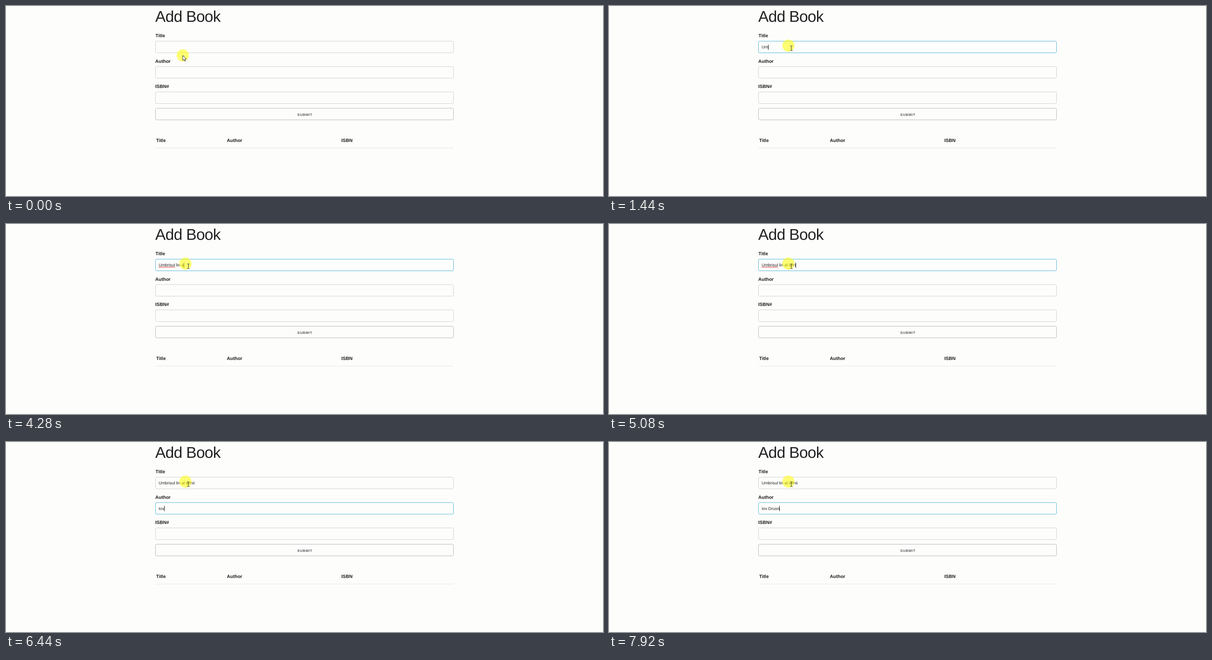
These frames come from a looping animation (1280 by 408 pixels, 8 s). An HTML page:

```html
<!DOCTYPE html>
<html lang="en">
<head>
<meta charset="utf-8">
<title>Add Book</title>
<style>
  html, body { margin: 0; width: 100%; height: 100%; overflow: hidden; background: #fdfdfc; }
  svg { display: block; width: 1280px; height: 408px; }
  text { font-family: "Liberation Sans", Arial, sans-serif; fill: #222; white-space: pre; text-rendering: geometricPrecision; }
  .heading { font-size: 33.5px; letter-spacing: -0.67px; }
  .label { font-size: 10.05px; font-weight: 700; fill: #1c1c1c; }
  .submit { font-size: 7.37px; font-weight: 700; letter-spacing: 0.67px; fill: #555; }
  .value { font-size: 8.93px; }
  .box { fill: none; stroke: #d1d1d1; }
  .button { stroke: #bbb; }
  .box.focused { stroke: #58b9d6; }
</style>
</head>
<body>
<svg id="stage" viewBox="0 0 1280 408"></svg>
<script>
const LOOP = 8000;
const stage = document.getElementById("stage");

function add(tag, attrs, content = "") {
  const node = document.createElementNS("http://www.w3.org/2000/svg", tag);
  set(node, attrs);
  node.textContent = content;
  return stage.appendChild(node);
}
function set(node, attrs) {
  for (const key in attrs) node.setAttribute(key, attrs[key]);
}
function show(node, visible) {
  node.setAttribute("visibility", visible ? "visible" : "hidden");
}
const label = (x, y, content, kind = "label") => add("text", { x, y, class: kind }, content);
const box = (y, kind = "box") => add("rect", { x: 320.5, y, width: 639, height: 25, rx: 2.7, class: kind });

label(320, 34, "Add Book", "heading");
label(320.5, 67.2, "Title");
label(320, 121.8, "Author");
label(320, 176.4, "ISBN#");
label(322, 292.3, "Title");
label(473.5, 292.3, "Author");
label(719, 292.3, "ISBN");
add("path", { d: "M320 305H960", stroke: "#e6e6ea" });

// Each key time types one more character.
function makeField(y, content, keys, focus, blur) {
  return { y, content, keys, focus, blur, box: box(y), text: label(327.2, y + 15.9, "", "value") };
}
const fields = [
  makeField(75.5, "Umbrisul lin al iernii",
    [1200, 1360, 1760, 1800, 1880, 2120, 2200, 2280, 2480, 3240, 3360,
     3600, 3760, 4200, 4440, 4560, 4680, 4800, 4920, 5040, 5120, 5200], 560, 5440),
  makeField(130, "Iov Drusn",
    [6080, 6240, 6400, 6560, 7120, 7200, 7440, 7640, 7800], 5440, LOOP)
];
box(184.5);
box(219.5, "box button");
label(624.6, 235.7, "SUBMIT", "submit");

const underline = add("path", { stroke: "#e25a5a", "stroke-width": 1.1 });
const caret = add("rect", { width: 1, height: 11, fill: "#111" });
const halo = add("circle", { r: 13, fill: "#ff0", "fill-opacity": 0.55 });
const ring = add("circle", { fill: "none", stroke: "#7f9a72", "stroke-width": 1.5 });
const arrow = add("path", {
  d: "M0 0V11L2.6 8.6L4.4 12.6L6 11.9L4.3 8H7.6Z",
  fill: "#fff", stroke: "#222", "stroke-width": 0.9
});
const beam = add("path", {
  d: "M-2.5 -5H-0.6L0 -4.4L0.6 -5H2.5M0 -4.4V4.4M-2.5 5H-0.6L0 4.4L0.6 5H2.5",
  fill: "none", stroke: "#333", "stroke-width": 1
});

const clamp = v => Math.min(1, Math.max(0, v));
const progress = (t, from, to) => clamp((t - from) / (to - from));
const mix = (a, b, p) => a + (b - a) * p;

function drawField(field, t) {
  const typed = field.keys.filter(key => key <= t);
  const focused = t >= field.focus && t < field.blur;
  field.text.textContent = field.content.slice(0, typed.length);
  field.box.classList.toggle("focused", focused);
  if (!focused) return;
  const lastAction = typed.length ? typed[typed.length - 1] : field.focus;
  const width = typed.length ? field.text.getComputedTextLength() : 0;
  set(caret, { x: Math.round(327 + width), y: field.y + 7.5 });
  show(caret, (t - lastAction) % 1000 < 500);
}

function drawPointer(t) {
  const raw = progress(t, 80, 480);
  const p = raw * raw * (3 - 2 * raw);
  const x = mix(379, 384.7, p), y = mix(106, 85, p);
  const overInput = y < 100;
  set(halo, { cx: x, cy: y });
  set(arrow, { transform: `translate(${x} ${y})` });
  set(beam, { transform: `translate(${x + 6.3} ${y + 5.7})` });
  show(arrow, !overInput);
  show(beam, overInput);

  const spread = progress(t, 520, 760);
  set(ring, { cx: 389, cy: 90, r: mix(5, 18, spread), opacity: mix(1, 0.3, spread) });
  show(ring, spread > 0 && spread < 1);
}

function draw(t) {
  show(caret, false);
  fields.forEach(field => drawField(field, t));
  const title = fields[0];
  const misspelled = t >= 2520 && t < title.blur;
  show(underline, misspelled);
  if (misspelled) {
    const end = 327.2 + title.text.getSubStringLength(0, 8);
    set(underline, { d: `M327.2 92.6H${end}` });
  }
  drawPointer(t);
}

const start = performance.now();
function tick() {
  draw((performance.now() - start) % LOOP);
  requestAnimationFrame(tick);
}
tick();
</script>
</body>
</html>
```
